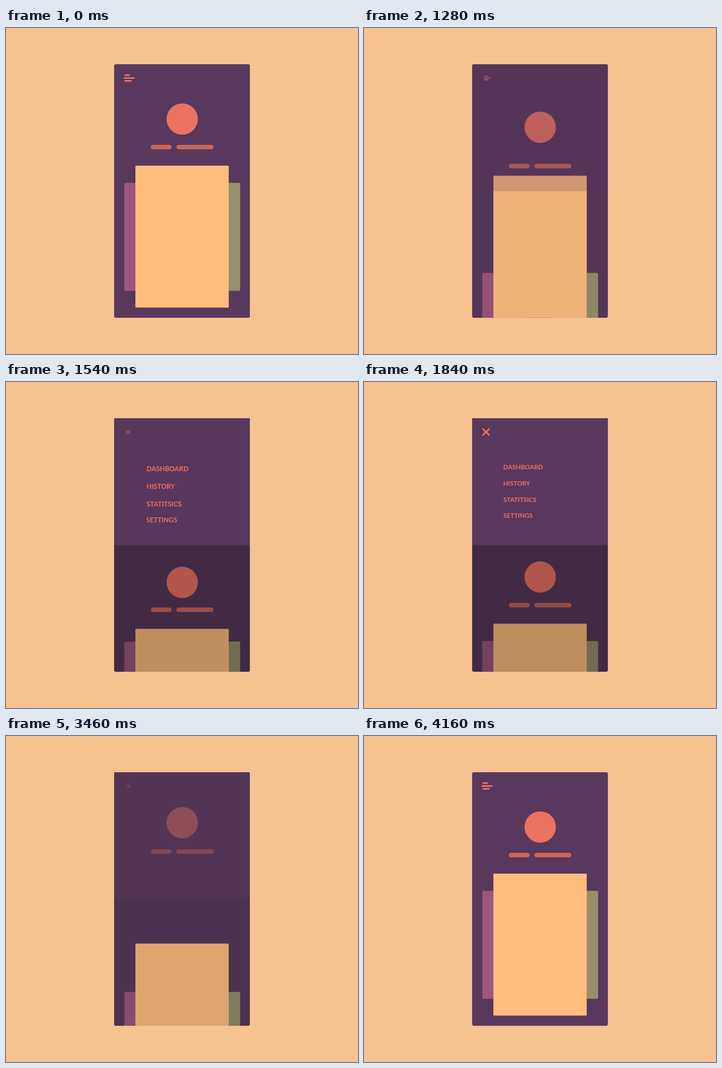
Animation of 778 by 720 pixels, one loop 4440 ms. Source, as an HTML page with a canvas:

```html
<!DOCTYPE html>
<html lang="en">
<head>
<meta charset="utf-8">
<title>Menu transition</title>
<style>
  html, body { margin: 0; width: 100%; height: 100%; overflow: hidden; background: #f6c28f; }
  canvas { display: block; }
</style>
</head>
<body>
<canvas id="stage" width="778" height="720"></canvas>
<script>
const ctx = document.getElementById('stage').getContext('2d');
const LOOP = 4440, DROP = 230;
const CORAL = '#ec7262', PLUM = '#58385c';

// label, left edge, baseline, point it grows from, start time
const items = [
  ['DASHBOARD', 308, 193, 263.6, 118, 1307],
  ['HISTORY', 308, 229, 264, 105, 1307],
  ['STATITSICS', 308, 265, 266, 97, 1307],
  ['SETTINGS', 308, 301, 278, 137, 1316]
];

// Underdamped spring from 0 to 1, ms is the time since its start
function spring(ms) {
  if (ms <= 0) return 0;
  const w = 17, z = 0.67, s = ms / 1000, d = Math.sqrt(1 - z * z);
  const a = w * d * s;
  return 1 - Math.exp(-z * w * s) * (Math.cos(a) + z / d * Math.sin(a));
}

function ease(t, from, to) {
  const p = Math.min(1, Math.max(0, (t - from) / (to - from)));
  return (1 - Math.cos(Math.PI * p)) / 2;
}

const drop = (t, open, close) => DROP * (spring(t - open) - spring(t - close));

function box(x, y, w, h, r, color) {
  ctx.fillStyle = color;
  ctx.beginPath();
  ctx.roundRect(x, y, w, h, r);
  ctx.fill();
}

function line(x1, y1, x2, y2) {
  ctx.beginPath();
  ctx.moveTo(x1, y1);
  ctx.lineTo(x2, y2);
  ctx.stroke();
}

// Draws an icon around its centre, shrunk and faded by size
function icon(cx, cy, size, paint) {
  if (size < 0.01) return;
  ctx.save();
  ctx.translate(cx, cy);
  ctx.scale(size, size);
  ctx.globalAlpha = Math.min(1, size);
  ctx.strokeStyle = CORAL;
  ctx.lineWidth = 3.4;
  ctx.lineCap = 'round';
  paint();
  ctx.restore();
}

function burger() {
  line(-8.5, -6.5, 0.5, -6.5);
  line(-10.5, 0, 10.5, 0);
  line(-8.5, 6.3, 4, 6.3);
}

function cross() {
  line(-6.5, -6.5, 6.5, 6.5);
  line(-6.5, 6.5, 6.5, -6.5);
}

function content(t) {
  const side = 342 + drop(t, 1140, 3446);
  box(261.5, side, 100, 238.5, 3, '#9e567f');
  box(417.5, side, 100, 238.5, 3, '#968f6c');
  box(286, 304 + drop(t, 1252, 3400), 206.3, 313.5, 2, '#ffbe7e');

  const bars = 258 + drop(t, 1239, 3257);
  box(320, bars, 46, 10, 5, '#cb6757');
  box(376.5, bars, 82, 10, 5, '#cb6757');

  ctx.fillStyle = CORAL;
  ctx.beginPath();
  ctx.arc(389.5, 201 + drop(t, 1255, 3251), 34.6, 0, Math.PI * 2);
  ctx.fill();
}

function menu(t) {
  ctx.fillStyle = CORAL;
  ctx.font = 'bold 14px Lato, sans-serif';
  ctx.textBaseline = 'alphabetic';
  ctx.textAlign = 'left';
  for (const [label, x, y, ox, oy, start] of items) {
    const p = spring(t - start) - spring(t - 3260);
    if (p < 0.01 || t > 3500) continue;
    const half = ctx.measureText(label).width / 2;
    const cx = x + half, cy = y - 5;
    ctx.save();
    ctx.translate(ox + (cx - ox) * p, oy + (cy - oy) * p);
    ctx.scale(p, p);
    ctx.fillText(label, -half, 5);
    ctx.restore();
  }
}

function draw(t) {
  const open = ease(t, 1140, 1590) - ease(t, 3242, 3690);
  ctx.fillStyle = '#f6c28f';
  ctx.fillRect(0, 0, 778, 720);
  box(239, 80, 300, 560, 4, PLUM);

  ctx.save();
  ctx.beginPath();
  ctx.roundRect(239, 80, 300, 560, 4);
  ctx.clip();
  content(t);
  ctx.fillStyle = `rgba(0, 0, 0, ${0.255 * open})`;
  ctx.fillRect(239, 80, 300, 560);
  ctx.restore();

  ctx.globalAlpha = open;
  ctx.fillStyle = PLUM;
  ctx.fillRect(239, 80, 300, 280.5);
  ctx.globalAlpha = 1;

  icon(272, 110.5, 1 - ease(t, 1140, 1470) + ease(t, 3330, 3640), burger);
  icon(269.7, 110.5, ease(t, 1370, 1680) - ease(t, 3250, 3450), cross);
  menu(t);
}

const begin = performance.now();
function tick() {
  draw((performance.now() - begin) % LOOP);
  requestAnimationFrame(tick);
}
tick();
</script>
</body>
</html>
```
